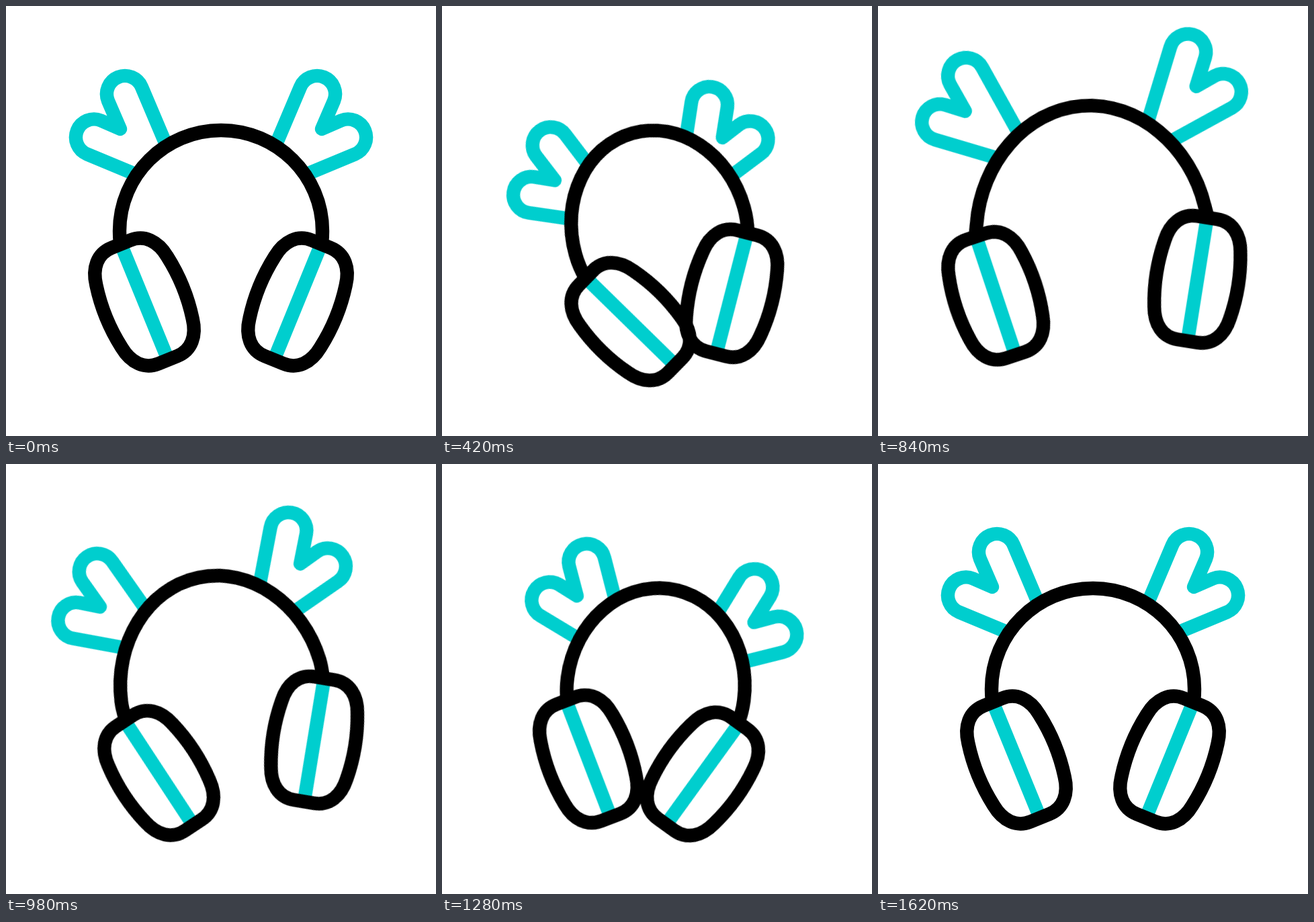
These frames come from a looping animation (640x640 px, 2.4 s). An HTML page without scripts:

```html
<!DOCTYPE html>
<html lang="en">
<head>
<meta charset="utf-8">
<title>Antler earmuffs</title>
<style>
  /* Degrees each side swings inward; negative opens the earmuffs. */
  @property --squeeze {
    syntax: "<number>";
    inherits: true;
    initial-value: 0;
  }

  html, body { margin: 0; height: 100%; overflow: hidden; background: #fff; }

  svg {
    display: block;
    width: 100vw;
    height: 100vh;
    fill: none;
    stroke: #000;
    stroke-width: 20.4;
    stroke-linejoin: round;
  }

  .accent { stroke: #00cece; }

  .squeeze, .sway, .band {
    animation: squeeze 2400ms cubic-bezier(.5, 0, .5, 1) infinite;
  }

  .sway { transform-origin: 320px 320px; animation-name: sway; }

  .band { fill: #fff; animation-name: bend; }

  /* The antlers tip slightly to one side as the band flexes. */
  .antlers {
    transform-origin: 320px 163px;
    transform: rotate(calc(var(--squeeze) * .17deg));
  }

  .antler {
    transform: translate(calc(var(--squeeze) * 2.7px), calc(var(--squeeze) * 5.2px));
  }

  .cup {
    transform-origin: 320px 185px;
    transform: rotate(calc(var(--squeeze) * -1deg));
  }

  @keyframes squeeze {
    0%, 67.5%, 100% { --squeeze: 0; transform: translate(0, 0); }
    16.67% { --squeeze: 7.9; transform: translate(0, 0); }
    32%, 33.33% { --squeeze: -8.8; transform: translate(-3px, -1.5px); }
    48.54% {
      --squeeze: 7.2;
      transform: translate(0, 0);
      animation-timing-function: cubic-bezier(.4, 0, .6, 1);
    }
  }

  @keyframes bend {
    0%, 67.5%, 100% {
      d: path("M170 353Q169 345 169 335C169 252 237 185 320 185C403 185 471 252 471 335Q471 345 470 353");
    }
    16.67%, 48.54% {
      d: path("M195 374Q190 355 190 335C190 252 248 184.5 320 184.5C392 184.5 450 252 450 335Q450 355 445 374");
    }
    32%, 33.33% {
      d: path("M146 330Q147 321 149 312C163 222 235 149 320 149C405 149 477 222 491 312Q493 321 494 330");
    }
    48.54% { animation-timing-function: cubic-bezier(.4, 0, .6, 1); }
  }

  @keyframes sway {
    0%, 67.5%, 100% { transform: rotate(0deg); }
    14.79% { transform: rotate(-18deg); }
    27.5% { transform: rotate(13deg); }
    39.88%, 40.83% { transform: rotate(-12deg); }
    57.29% { transform: rotate(9.5deg); }
  }
</style>
</head>
<body>
<svg viewBox="0 0 640 640">
  <defs>
    <path id="antler" class="antler accent"
      d="M258 253L202 120.7A27 27 0 0 0 152 141.3L170 183L141.3 170.5A27 27 0 0 0 120.7 220.5L241 270.5"/>
    <g id="cup" class="cup">
      <g transform="translate(206 440.5) rotate(-22.2)">
        <path class="accent" d="M0-88V88"/>
        <path d="M-15-93H15C38-93 53-76 57-50Q66 0 57 50C53 76 38 93 15 93H-15C-38 93-53 76-57 50Q-66 0-57-50C-53-76-38-93-15-93Z"/>
      </g>
    </g>
  </defs>
  <g class="squeeze">
    <g class="sway">
      <g class="antlers">
        <use href="#antler"/>
        <use href="#antler" transform="matrix(-1 0 0 1 640 0)"/>
      </g>
      <path class="band" d="M170 353Q169 345 169 335C169 252 237 185 320 185C403 185 471 252 471 335Q471 345 470 353"/>
      <use href="#cup"/>
      <use href="#cup" transform="matrix(-1 0 0 1 640 0)"/>
    </g>
  </g>
</svg>
</body>
</html>
```
